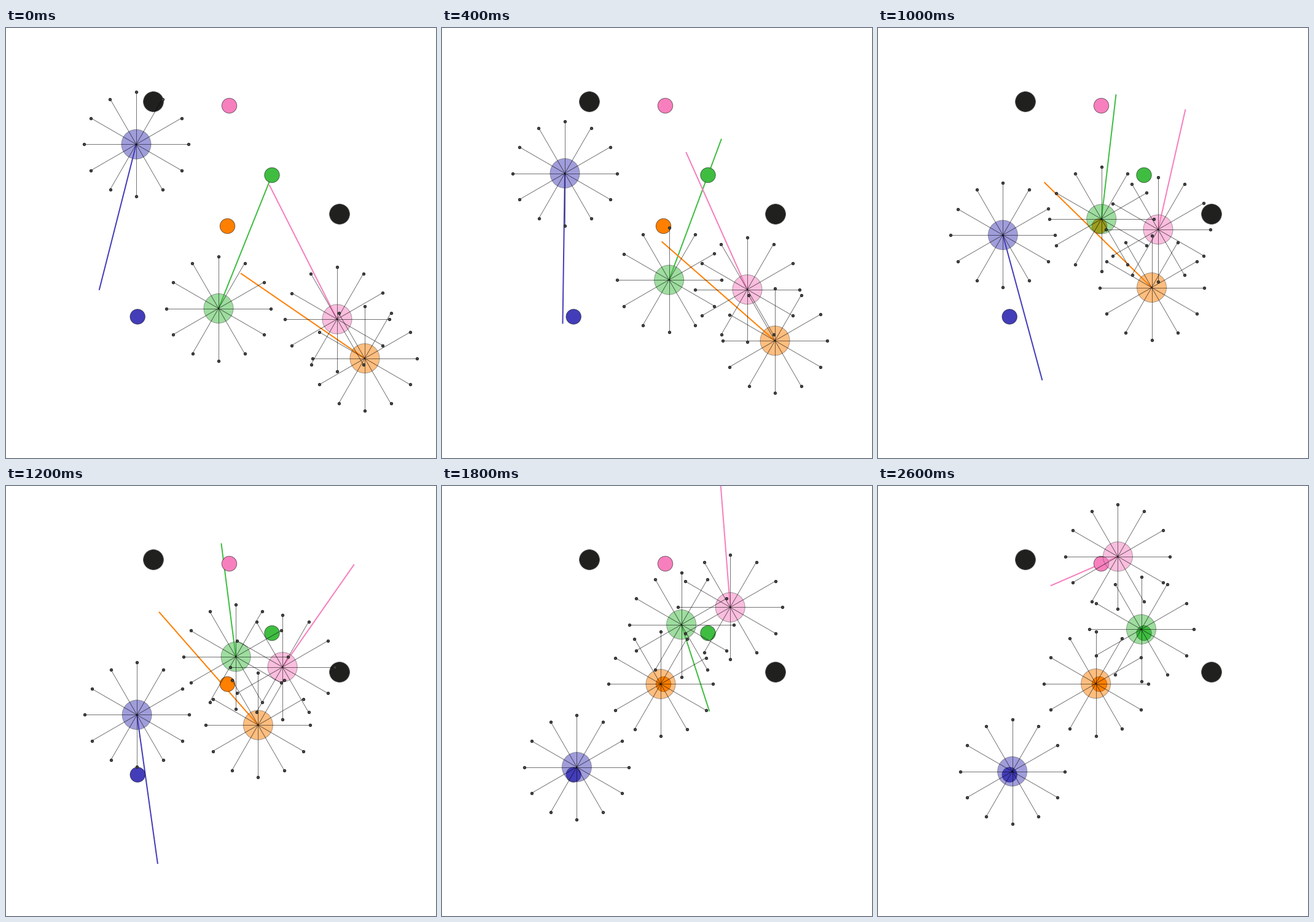
These frames come from a looping animation (700 by 700 pixels, 2.7 s). A matplotlib script:

```python
import numpy as np
import matplotlib.pyplot as plt
from matplotlib.animation import FuncAnimation
from matplotlib.collections import LineCollection
from matplotlib.patches import Circle

SIZE, FRAMES, INTERVAL = 700, 27, 100
REACH = 85          # length of the sensor rays
LIMIT = 245         # longest pull
BRAKE = 42          # distance at which the pull starts to fade
SPACE, PUSH = 122, 5.3
AHEAD = 4           # frames a lone robot looks forward along its path

BLUE, GREEN, PINK, ORANGE = "#433db9", "#3fbd41", "#f77fbe", "#ff7f00"
DARK = "#20211f"
KEY_TIMES = np.array([0, 4, 10, 14, 18, 22, 26])

angles = np.radians(np.arange(0, 360, 30))
RAYS = REACH * np.column_stack([np.cos(angles), np.sin(angles)])


def px(width):
    return width * 0.72


def smooth_path(points):
    """Cubic Hermite path through the points, sampled once per frame."""
    p = np.array(points, float)
    h = np.diff(KEY_TIMES)[:, None]
    slope = np.diff(p, axis=0) / h
    inner = (slope[:-1] * h[1:] + slope[1:] * h[:-1]) / (h[1:] + h[:-1])
    v = np.vstack([2 * slope[0] - inner[0], inner, 2 * slope[-1] - inner[-1]])

    n = np.arange(FRAMES)
    i = np.clip(np.searchsorted(KEY_TIMES, n, side="right") - 1, 0, len(h) - 1)
    d = h[i]
    s = (n - KEY_TIMES[i])[:, None] / d
    return ((1 + 2 * s) * (1 - s)**2 * p[i] + s * (1 - s)**2 * d * v[i]
            + s**2 * (3 - 2 * s) * p[i + 1] + s**2 * (s - 1) * d * v[i + 1])


def split(vector):
    """Length and direction of a vector."""
    length = np.hypot(*vector)
    return length, vector / max(length, 1e-9)


class Robot:
    def __init__(self, color, goal, points):
        self.goal = np.array(goal)
        self.path = smooth_path(points)
        self.peer = None
        self.arrow, = ax.plot([], [], color=color, lw=px(2), zorder=1,
                              solid_capstyle="butt")
        ax.add_patch(Circle(goal, 12.2, fc=color, ec=(0, 0, 0, 0.5),
                            lw=px(1), zorder=2))
        self.body = ax.add_patch(Circle((0, 0), 24, fc=color, ec="#505050",
                                        alpha=0.5, lw=px(1), zorder=3))
        self.rays = ax.add_collection(
            LineCollection([], colors="black", alpha=0.6, linewidths=px(0.9),
                           zorder=4))
        self.tips, = ax.plot([], [], "o", ms=px(4.4), mfc="#444444",
                             mec="#222222", mew=px(0.9), zorder=5)

    def command(self, n):
        """Pull towards the aim, plus a push away from a crossing peer."""
        here = self.path[n]
        aim = self.goal if self.peer else self.path[min(n + AHEAD, FRAMES - 1)]
        gap, heading = split(aim - here)
        strength = min(1, (gap / BRAKE)**2)
        total = LIMIT * strength * heading
        if self.peer:
            gap, away = split(here - self.peer.path[n])
            total = total + strength * PUSH * max(0, SPACE - gap) * away
        return total

    def place(self, n):
        here = self.path[n]
        tips = here + RAYS
        self.arrow.set_data(*np.array([here, here + self.command(n)]).T)
        self.body.center = tuple(here)
        self.rays.set_segments([[here, tip] for tip in tips])
        self.tips.set_data(*tips.T)
        return [self.arrow, self.body, self.rays, self.tips]


fig = plt.figure(figsize=(SIZE / 100, SIZE / 100), dpi=100, facecolor="white")
ax = fig.add_axes([0, 0, 1, 1])
ax.set_xlim(0, SIZE)
ax.set_ylim(SIZE, 0)
ax.axis("off")

for spot in [(240, 120), (543, 303)]:
    ax.add_patch(Circle(spot, 16.4, fc=DARK, ec="#555555", lw=px(0.8), zorder=2))

blue = Robot(BLUE, (214.2, 470),
             [(212, 189.3), (200, 236.5), (203.3, 337), (222, 406),
              (219.4, 457.5), (218.2, 465), (218.6, 464.6)])
green = Robot(GREEN, (433, 239.5),
              [(346, 456.5), (369.6, 410), (363.7, 311), (385, 250),
               (389.6, 225.6), (417.5, 235), (428.5, 233.3)])
pink = Robot(PINK, (363.5, 126.5),
             [(539, 474), (497, 425.7), (456, 328), (449.5, 261.7),
              (469.2, 197.4), (446.2, 136), (390.4, 114.8)])
orange = Robot(ORANGE, (360.5, 322.5),
               [(584, 537.8), (542, 509), (445.5, 422.5), (380.3, 358.6),
                (356, 322.4), (353.6, 323.4), (354.6, 321.7)])
green.peer, pink.peer = pink, green
robots = [blue, green, pink, orange]


def update(n):
    return [artist for robot in robots for artist in robot.place(n)]


anim = FuncAnimation(fig, update, frames=FRAMES, interval=INTERVAL,
                     init_func=lambda: update(0), repeat=True, repeat_delay=0)
plt.show()
```
